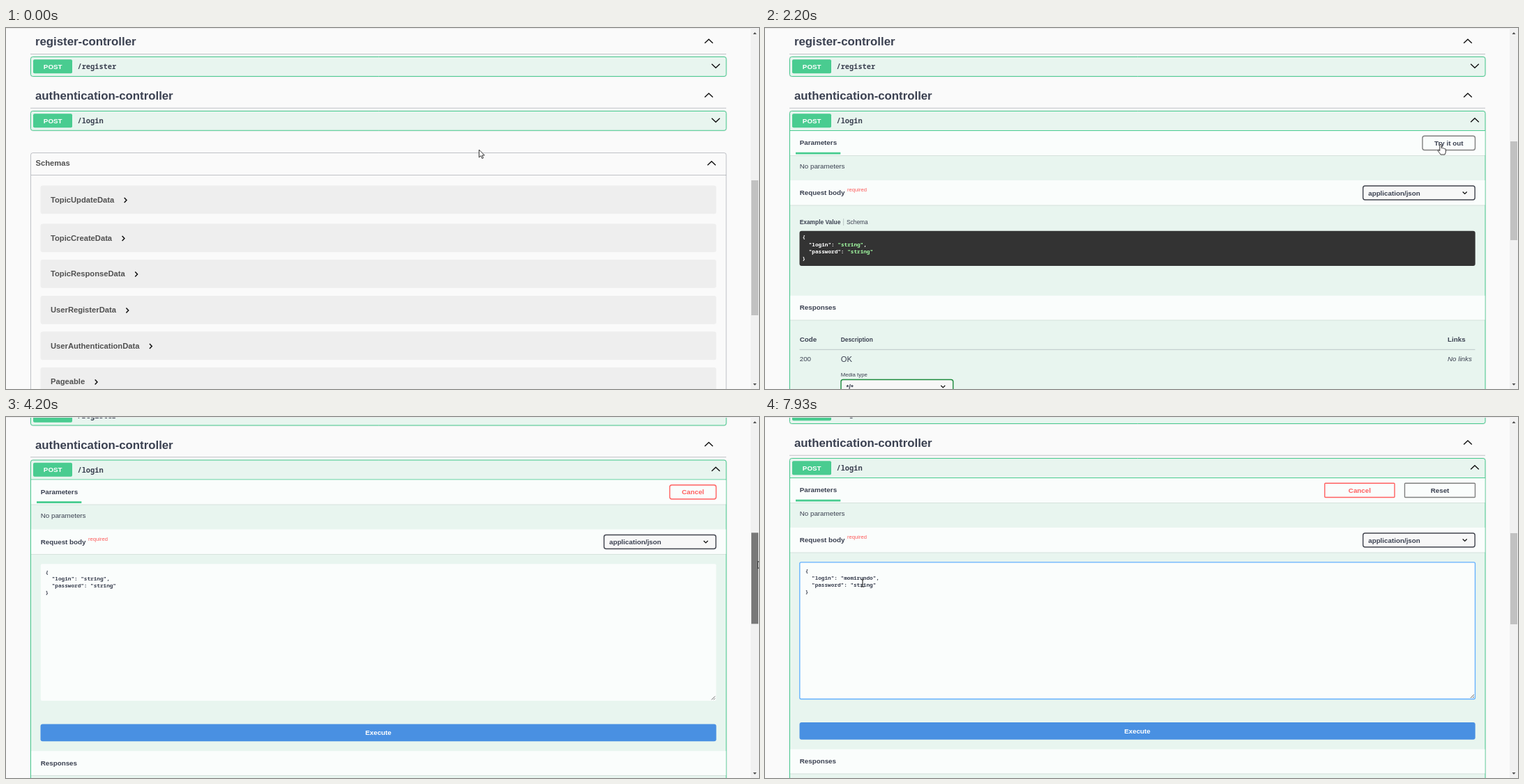
Write an HTML page with a canvas that moves like this. It is 1080 by 519 pixels and loops after 8 s.

```html
<!DOCTYPE html>
<html lang="en">
<head>
<meta charset="utf-8">
<title>API console</title>
<style>
html, body { margin: 0; width: 100%; height: 100%; overflow: hidden; background: #fafafa; }
canvas { display: block; width: 1080px; height: 519px; }
</style>
</head>
<body>
<canvas id="stage"></canvas>
<script>
const W = 1080, H = 519, LOOP = 8000, STEP = 200 / 3;
const SANS = '"Liberation Sans", Arial, sans-serif';
const MONO = '"Noto Sans Mono", "DejaVu Sans Mono", monospace';
const INK = '#3b4151', GREEN = '#49cc90', RED = '#ff6060', PANEL = '#fafdfc', TINT = '#e8f5ef';
const LINE = 'rgba(59,65,81,.3)';
const USER = 'momirundo';
const KEY_TIMES = [5800, 5930, 6000, 6130, 6400, 6600, 6730, 6800, 6930];
const MODELS = [
  ['TopicUpdateData', 226.5], ['TopicCreateData', 281.5], ['TopicResponseData', 333],
  ['UserRegisterData', 385], ['UserAuthenticationData', 436.5], ['Pageable', 488]
];
// time, x, y
const POINTER = [
  [0, 678.5, 175], [333, 240, 330], [400, 150, 338], [467, 88, 250], [533, 95, 132],
  [667, 560, 124], [800, 1014, 136], [1333, 1014, 136], [1600, 800, 170], [1800, 545, 195],
  [1933, 640, 190], [2200, 969, 167], [2400, 969, 167], [2800, 985, 290], [3133, 1066, 215],
  [3333, 1060, 200], [3600, 1072, 212], [3933, 1078.5, 193.5], [4067, 1078.5, 194],
  [4200, 1078.5, 207], [4400, 1078.5, 208], [4870, 129.5, 231], [7200, 129.5, 231],
  [7533, 160, 238], [7800, 148, 240], [7933, 140, 239]
];
const SCROLL = [[4000, 0], [4067, 1.8], [4200, 57.5], [4333, 60]];

const canvas = document.getElementById('stage');
const g = canvas.getContext('2d');
const ratio = window.devicePixelRatio || 1;
canvas.width = W * ratio;
canvas.height = H * ratio;

function track(keys, t, i) {
  let a = keys[0];
  for (const b of keys) {
    if (t < b[0]) return b === a ? a[i] : a[i] + (b[i] - a[i]) * (t - a[0]) / (b[0] - a[0]);
    a = b;
  }
  return a[i];
}

function text(s, x, y, size, weight = 'normal', color = INK, align = 'left', family = SANS) {
  g.font = `${weight} ${size}px ${family}`;
  g.textAlign = align;
  g.fillStyle = color;
  g.fillText(s, x, y);
}

function code(s, x, y, color = INK, size = 7.7) {
  text(s, x, y, size, 'bold', color, 'left', MONO);
}

function fill(x, y, w, h, color) {
  g.fillStyle = color;
  g.fillRect(x, y, w, h);
}

function box(x, y, x2, y2, r, color, border, width = 1) {
  g.beginPath();
  g.roundRect(x, y, x2 - x, y2 - y, r);
  if (color) { g.fillStyle = color; g.fill(); }
  if (border) { g.strokeStyle = border; g.lineWidth = width; g.stroke(); }
}

function path(points, color, width) {
  g.beginPath();
  for (const [x, y] of points) g.lineTo(x, y);
  g.strokeStyle = color;
  g.lineWidth = width;
  g.stroke();
}

// dir is 1 for an arrow pointing down, -1 for up
function chevron(x, y, dir, half = 5.8, width = 1.4) {
  const d = half * .48 * dir;
  path([[x - half, y - d], [x, y + d], [x + half, y - d]], '#111', width);
}

function heading(name, y) {
  text(name, 42, y + 25.3, 16.8, 'bold');
  chevron(1008, y + 19, -1);
  fill(35, y + 37, 998, 1, LINE);
}

function operation(name, y, bottom, open) {
  box(35.5, y, 1033, bottom, 3, null, 'rgba(0,0,0,.07)', 2.5);
  box(35.5, y, 1033, bottom, 3, TINT, GREEN);
  box(39, y + 3.7, 95, y + 23.7, 2, GREEN);
  text('POST', 67.2, y + 17.3, 9.8, 'bold', '#fff', 'center');
  code(name, 102.5, y + 17.6, INK, 10.3);
  chevron(1018, y + 13, open ? -1 : 1);
  if (open) fill(36, y + 27.5, 997, 1, GREEN);
}

function band(y, bottom) {
  fill(36, y, 996.5, bottom - y, PANEL);
  fill(36, bottom, 996.5, 1, 'rgba(0,0,0,.08)');
}

function button(label, x, x2, color, border, r = 3) {
  box(x, 155.3, x2, 175.5, r, null, border, 1.4);
  text(label, (x + x2) / 2, 168.6, 9.8, 'bold', color, 'center');
}

function select(label, x, y, x2, border) {
  box(x, y, x2, y + 20, 3, '#f7f7f7', border, 1.4);
  text(label, x + 7.5, y + 13.6, 9.8, 'bold');
  chevron(x2 - 14.5, y + 10, 1, 3, 1.3);
}

function copyIcon() {
  box(987, 124.7, 1003.5, 142, 3, '#7d8492');
  box(991, 129, 999, 138.5, 1, null, '#fff');
  fill(993, 127.5, 4, 2.5, '#fff');
  path([[993, 132.5], [997, 132.5]], '#fff', .8);
  path([[999.5, 135.5], [995, 135.5], [996.8, 133.8]], '#fff', .9);
}

function spinner(t) {
  const a = (t - 1070) / 1000 * Math.PI * 2;
  g.beginPath();
  g.arc(534.3, 192.5, 8.5, a, a + Math.PI * 1.5);
  g.strokeStyle = '#555';
  g.lineWidth = 2;
  g.stroke();
}

function schemas(dy) {
  g.save();
  g.translate(0, dy);
  box(35.5, 179.5, 1033, 700, 3, null, LINE);
  fill(36, 211, 997, 1, LINE);
  text('Schemas', 42.5, 197.8, 11.2, 'bold', '#505050');
  chevron(1012, 194.5, -1);
  for (const [name, y] of MODELS) {
    box(49.5, y, 1018.7, y + 40.7, 3, '#eee');
    text(name, 64, y + 24.2, 11.2, 'bold', '#505050');
    const x = 64 + g.measureText(name).width + 14.5;
    path([[x, y + 17.5], [x + 3.3, y + 21], [x, y + 24.5]], '#111', 1.5);
  }
  g.restore();
}

function responses(y) {
  band(y, y + 34.8);
  text('Responses', 49.7, y + 20.4, 9.8, 'bold');
  text('Code', 49.7, y + 66.2, 9.8, 'bold');
  text('Description', 108.7, y + 66, 8.4, 'bold');
  text('Links', 979, y + 66.2, 9.8, 'bold');
  fill(49.5, y + 77, 969, 1, 'rgba(59,65,81,.25)');
  text('200', 49.7, y + 94.2, 9.8);
  text('OK', 108.7, y + 95.2, 11.2);
  text('No links', 979, y + 94.2, 9.8, 'italic');
  text('Media type', 108.7, y + 116.4, 7.8);
  select('*/*', 109, y + 120.7, 269.8, '#1c8a3c');
}

function example() {
  text('Example Value', 49.7, 281.7, 8.4, 'bold');
  fill(112.3, 274, .8, 10, LINE);
  text('Schema', 117, 281.7, 8.4);
  box(49.5, 291.7, 1018.7, 342, 3, '#333');
  const white = '#fff', lime = '#a2fca2', cell = 4.62;
  code('{', 53.5, 303.3, white);
  code('  "login": ', 53.5, 313.6, white);
  code('"string"', 53.5 + 11 * cell, 313.6, lime);
  code(',', 53.5 + 19 * cell, 313.6, white);
  code('  "password": ', 53.5, 323.8, white);
  code('"string"', 53.5 + 14 * cell, 323.8, lime);
  code('}', 53.5, 334, white);
}

function editor(t) {
  const focus = t >= 4930;
  const typed = KEY_TIMES.filter(k => t >= k - 4).length;
  const login = typed ? USER.slice(0, typed) : 'string';
  const x = focus ? 57.8 : 56.5, y = focus ? 284.2 : 283;
  box(49.8, 268.8, 1018.5, 465.5, 2, PANEL, focus && '#61affe', 1.3);
  code('{', x, y);
  code(`  "login": "${login}",`, x, y + 9.8);
  code('  "password": "string"', x, y + 19.5);
  code('}', x, y + 29.3);
  if (t >= 5130 && !typed) {
    fill(x + 55.4, y + 2.3, 27.7, 9.6, '#0078d7');
    code('string', x + 55.4, y + 9.8, '#fff');
  }
  path([[1012, 464], [1017, 459]], '#555', .9);
  path([[1015, 464], [1017, 462]], '#555', .9);
  box(49.5, 499, 1018.7, 523.7, 3, '#4990e2');
  text('Execute', 534, 514.6, 9.8, 'bold', '#fff', 'center');
}

function details(t) {
  const edit = t >= 2330;
  band(148, 183);
  text('Parameters', 49.7, 168.3, 9.8, 'bold');
  fill(44, 178.7, 64.3, 2.8, GREEN);
  if (!edit) {
    button('Try it out', 943, 1018.5, INK, '#808080');
  } else if (t < 5796) {
    button('Cancel', 952, 1018.5, RED, RED);
  } else {
    button('Cancel', 802.8, 903, RED, RED, 1);
    button('Reset', 917.5, 1018.5, INK, '#808080', 1);
  }
  text('No parameters', 49.7, 202.2, 9.8);
  band(219, 254.5);
  text('Request body', 49.7, 240.2, 9.8, 'bold');
  text('required', 118, 235.3, 7.6, 'normal', 'rgba(255,0,0,.65)');
  select('application/json', 857.7, 227, 1018.2, '#41444e');
  if (edit) editor(t); else example();
  responses(edit ? 537.7 : 384.8);
}

function scrollbar(t, scroll) {
  fill(1068, 0, 12, H, '#f1f1f1');
  let top = 219, end = 413;
  if (t >= 2330) { top = 152 + scroll * .25; end = top + 131; }
  else if (t >= 1200) { top = 163; end = 305; }
  else if (t >= 1000) { top = 203; end = 380; }
  const held = t >= 3930 && t < 4330, over = t >= 3200 && t < 3930;
  fill(1069, top, 10, end - top, held ? '#787878' : over ? '#a8a8a8' : '#c1c1c1');
  g.fillStyle = '#505050';
  for (const [y, d] of [[7.5, -1.5], [512.5, 1.5]]) {
    g.beginPath();
    g.moveTo(1071.5, y - d);
    g.lineTo(1076.5, y - d);
    g.lineTo(1074, y + d);
    g.fill();
  }
}

function shape(d, x, y) {
  const p = new Path2D(d);
  g.save();
  g.translate(x, y);
  g.lineJoin = 'round';
  g.fillStyle = '#fff';
  g.fill(p);
  g.strokeStyle = '#222';
  g.lineWidth = .9;
  g.stroke(p);
  g.restore();
}

function pointer(t) {
  const x = track(POINTER, t, 1), y = track(POINTER, t, 2);
  const onRow = t < 2000 && y > 119 && y < 147;
  const onButton = t >= 2100 && t < 2700 && x > 943 && x < 1019 && y > 155 && y < 176;
  if (t > 4400 && x < 1018 && y > 209) {
    path([[x - 2.3, y - 5.5], [x, y - 4.8], [x + 2.3, y - 5.5]], '#222', .9);
    path([[x - 2.3, y + 5.5], [x, y + 4.8], [x + 2.3, y + 5.5]], '#222', .9);
    path([[x, y - 5], [x, y + 5]], '#222', 1.1);
  } else if (onRow || onButton) {
    shape('M-1.2 8V1Q0-.7 1.2 1V5.5Q2.5 4.7 3.5 6Q4.8 5.4 5.6 6.7Q7.2 6.2 7.4 8V11Q7 13 6 15H0' +
      'Q-1.5 12.5-3.6 10Q-4.4 8.2-2.7 8.4L-1.2 9.6Z', x, y);
  } else {
    shape('M0 0V11L2.6 8.6L4.4 12.6L6.1 11.8L4.4 8H7.8Z', x, y);
  }
  return onRow;
}

function draw(t) {
  const scroll = track(SCROLL, t, 1);
  const loading = t >= 1000 && t < 1200, open = t >= 1200;
  g.setTransform(ratio, 0, 0, ratio, 0, 0);
  fill(0, 0, W, H, '#fafafa');
  g.save();
  g.translate(0, -scroll);
  heading('register-controller', 0);
  operation('/register', 41.5, 69.5, false);
  heading('authentication-controller', 77.7);
  operation('/login', 119.5, open ? 900 : loading ? 266 : 147.3, open || loading);
  if (open) details(t);
  else schemas(loading ? 118.7 : 0);
  if (loading) spinner(t);
  if (t >= 533 && t < 1400) copyIcon();
  g.restore();
  fill(0, 0, 1068, 1, '#e9e9e9');
  scrollbar(t, scroll);
  pointer(t);
}

function frame(now) {
  const t = now % LOOP;
  draw(Math.floor(t / STEP + .06) * STEP);
  requestAnimationFrame(frame);
}
requestAnimationFrame(frame);
</script>
</body>
</html>
```
